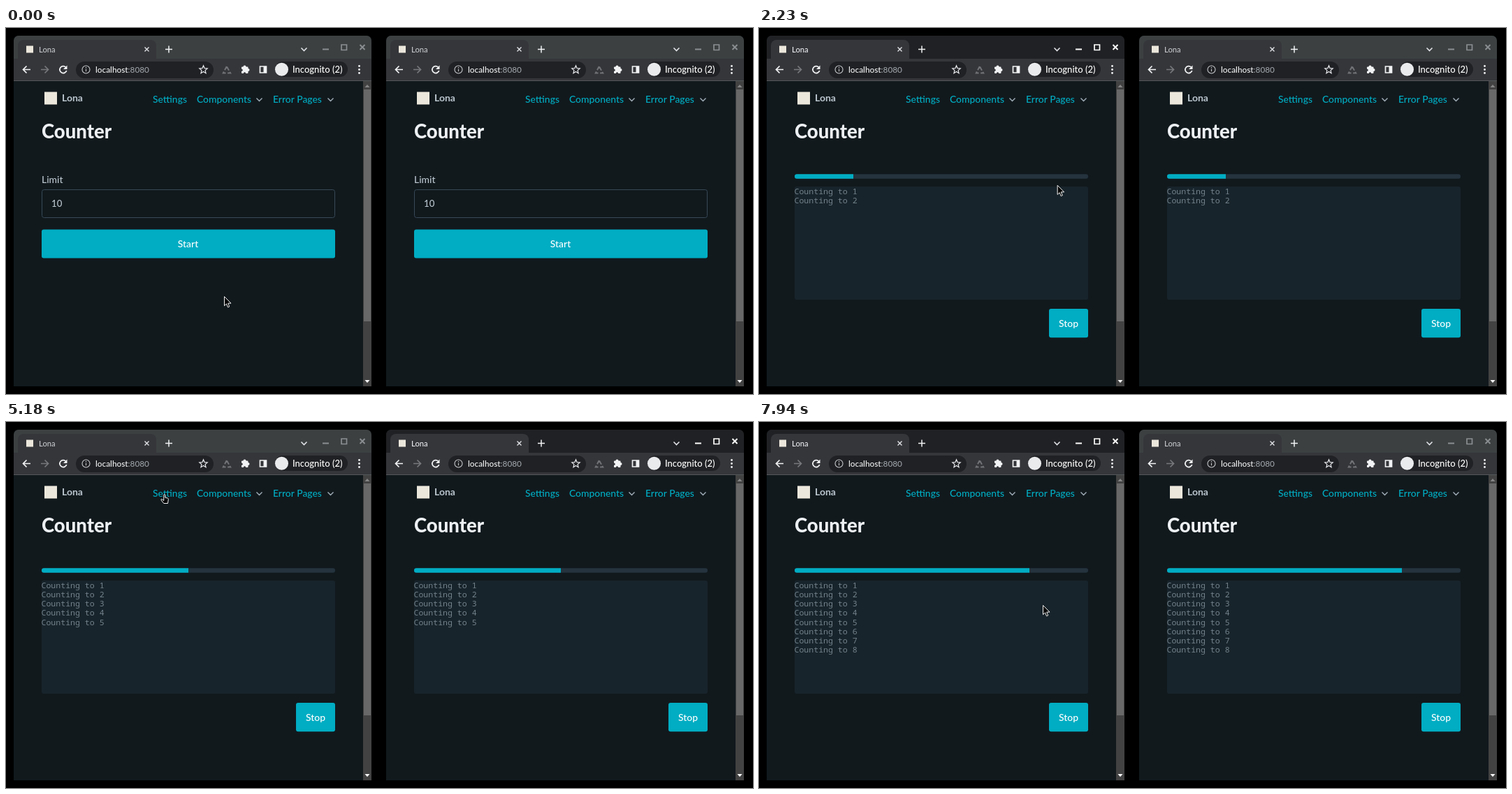
Write an HTML page with a canvas that moves like this. It is 1069 by 524 pixels and loops after 8 s.

```html
<!DOCTYPE html>
<html lang="en">
<head>
<meta charset="utf-8">
<title>Shared counter</title>
<style>
html, body { margin: 0; height: 100%; overflow: hidden; background: #000; }
canvas { display: block; }
</style>
</head>
<body>
<canvas id="stage" width="1069" height="524"></canvas>
<script>
const ctx = document.getElementById('stage').getContext('2d');
const LOOP = 8000;
const SANS = 'Lato, "Noto Sans", sans-serif';
const MONO = '"Noto Sans Mono", monospace';
const PAGE = '#11191d', BAR = '#35363a', DARK = '#202124', CYAN = '#00adc3';
const LIGHT = '#f1f3f4', LOGO = '#ece7dc';

// Pointer moves: start, end, visible steps, target x, target y
const moves = [
  [100, 410, 5, 306, 307],
  [1210, 1450, 4, 310, 308],
  [1510, 1970, 7, 385, 262],
  [2040, 2840, 11, 613, 58],
  [4520, 5180, 9, 225, 104],
  [5250, 5870, 9, 80, 57],
  [7640, 7940, 5, 406, 262]
];

const within = (t, from, to) => t >= from && t < to;
const smooth = p => p * p * (3 - 2 * p);

function pointerAt(t) {
  let x = 312, y = 384;
  for (const [start, end, steps, toX, toY] of moves) {
    if (t < start) break;
    const step = Math.floor((t - start) / (end - start) * (steps - 1) + 1e-6) + 1;
    const p = smooth(Math.min(1, step / steps));
    x += (toX - x) * p;
    y += (toY - y) * p;
  }
  return { x, y };
}

function box(x, y, w, h, color, radius = 0) {
  ctx.fillStyle = color;
  ctx.beginPath();
  ctx.roundRect(x, y, w, h, radius);
  ctx.fill();
}

function disc(x, y, r, color) {
  ctx.fillStyle = color;
  ctx.beginPath();
  ctx.arc(x, y, r, 0, 2 * Math.PI);
  ctx.fill();
}

function line(d, color, width = 1.5) {
  ctx.strokeStyle = color;
  ctx.lineWidth = width;
  ctx.stroke(new Path2D(d));
}

function shape(d, color) {
  ctx.fillStyle = color;
  ctx.fill(new Path2D(d));
}

function text(str, x, y, size, color, weight = 500, family = SANS, align = 'left') {
  ctx.font = `${weight} ${size}px ${family}`;
  ctx.textAlign = align;
  ctx.fillStyle = color;
  ctx.fillText(str, x, y);
}

function address(x, y, size) {
  text('localhost', x, y, size, LIGHT);
  text(':8080', x + ctx.measureText('localhost').width, y, size, '#9aa0a6');
}

function star(cx, cy, r) {
  let d = '';
  for (let i = 0; i < 10; i++) {
    const a = i * Math.PI / 5 - Math.PI / 2, k = i % 2 ? r * 0.45 : r;
    d += `${i ? 'L' : 'M'}${cx + k * Math.cos(a)} ${cy + k * Math.sin(a)}`;
  }
  line(d + 'Z', '#e8eaed', 1.2);
}

function titleBar(win) {
  const control = win.active ? '#fff' : '#8b8e91';
  box(0, 0, 512, 34, win.active ? DARK : '#3c4041');
  box(6, 6, 198, 34, BAR, [8, 8, 0, 0]);
  const s = 10 * win.icon;
  box(23 - s / 2, 19.5 - s / 2, s, s, LOGO);
  text(win.title, 36, 23.5, 11.2, win.active ? '#e8eaed' : '#c3c6c9');
  line('M187.5 16.5l6 6m0-6l-6 6', '#dfe1e5', 1.4);
  line('M217 19.5h10m-5-5v10', LIGHT, 1.5);
  line('M411.5 17.5l4 4 4-4', '#dfe1e5', 1.6);
  line('M442 19.5h9', control, 2);
  line('M469 13h7.5v7.5H469z', control, 1.7);
  line('M495.5 13l7 7m0-7l-7 7', control, 1.9);
}

function toolbar(win) {
  box(0, 33, 512, 31, BAR);
  box(0, 64, 512, 1, '#54575a');
  line('M24 48.5H13.5m5-5l-5 5 5 5', LIGHT, 1.7);
  line('M39 48.5h10.5m-5-5l5 5-5 5', '#76787b', 1.7);
  if (win.reloadHover) disc(71, 48.5, 12, '#505154');
  line('M74.4 45A5 5 0 1 0 75.7 50', LIGHT, 1.7);
  shape('M76.5 42.5v5.5H71z', LIGHT);

  box(89, 37, 197, 24, DARK, 12);
  line('M109 48.5a5.5 5.5 0 1 0-11 0 5.5 5.5 0 1 0 11 0M103.5 47.7v3.6', '#c6c9cc', 1.1);
  disc(103.5, 45.8, 0.8, '#c6c9cc');
  address(117, 52.5, 11.8);
  star(271.5, 48.8, 6);

  ctx.setLineDash([6, 2.5]);
  line('M304.8 44l-5 9.5h10.4z', '#707276', 2);
  ctx.setLineDash([]);

  box(326, 44.5, 9.5, 9.5, LIGHT, 1);
  disc(330.5, 44.5, 2, LIGHT);
  disc(335.5, 49, 2, LIGHT);
  disc(326, 49.3, 1.7, BAR);
  disc(330.5, 54, 1.7, BAR);

  line('M352.5 44h9v9h-9z', LIGHT, 1.7);
  box(357.5, 44, 4, 9, LIGHT);

  box(374, 37, 104, 22, DARK, 11);
  disc(383.5, 48.2, 9.5, '#e9ebed');
  text('Incognito (2)', 399, 52.5, 13, '#fff');
  for (const y of [43.5, 48.5, 53.5]) disc(494.5, y, 1.4, LIGHT);
}

function scrollBar() {
  box(500, 65, 12, 437, '#424242');
  box(501, 77, 10, 332, '#686868');
  shape('M502.5 74l3.5-4 3.5 4z', '#858585');
  shape('M502.5 493l3.5 4 3.5-4z', '#fff');
}

function navigation() {
  box(44, 80.5, 18, 18, LOGO);
  text('Lona', 69, 94, 14, '#bbc6ce', 700);
  text('Settings', 199, 96, 13.9, CYAN);
  text('Components', 262, 96, 13.9, CYAN);
  text('Error Pages', 371, 96, 13.9, CYAN);
  for (const x of [347.5, 449.5]) line(`M${x} 89.5l4 4 4-4`, '#a2afb9', 1.4);
}

function form(hover) {
  text('Limit', 40, 211, 13.9, '#bbc6ce');
  ctx.strokeStyle = '#374956';
  ctx.lineWidth = 1;
  ctx.beginPath();
  ctx.roundRect(40.5, 220.5, 419, 40, 3);
  ctx.stroke();
  text('10', 54, 245, 13.2, '#bbc6ce');
  box(40, 277.5, 420, 41, hover ? '#00bbd3' : CYAN, 3);
  text('Start', 249.5, 303, 13.9, '#fff', 500, SANS, 'center');
}

function counter(count) {
  box(40, 198.2, 420, 6.6, '#24333e', 3.3);
  box(40, 198.2, 42 * count, 6.6, CYAN, [3.3, 0, 0, 3.3]);
  box(40, 216, 420, 162, '#18242b', 3);
  for (let i = 1; i <= count; i++) {
    text(`Counting to ${i}`, 39.5, 213.9 + 13.14 * i, 11.55, '#73828c', 400, MONO);
  }
  box(404, 391, 56, 41.3, CYAN, 3);
  text('Stop', 432, 417, 13.9, '#fff', 500, SANS, 'center');
}

function drawWindow(x, win) {
  ctx.save();
  ctx.translate(x, 11);
  ctx.beginPath();
  ctx.roundRect(0, 0, 512, 502, [7, 7, 0, 0]);
  ctx.clip();
  box(0, 0, 512, 502, PAGE);
  titleBar(win);
  toolbar(win);
  scrollBar();
  navigation();
  if (!win.blank) {
    text('Counter', 40, 147, 27.5, '#edf0f3', 800);
    if (win.count) counter(win.count);
    else form(win.buttonHover);
  }
  if (win.status) {
    ctx.globalAlpha = win.status;
    box(0, 484, 91, 18, BAR, [0, 4, 0, 0]);
    text('localhost:8080', 6, 497, 11.6, '#bdc1c6');
  }
  ctx.restore();
}

function tooltip() {
  box(622, 71, 94, 19, '#fff');
  text('Reload this page', 628.5, 84.3, 11.4, '#3c4043');
}

function drawPointer({ x, y }, hand) {
  const d = hand
    ? 'M.8.7c0-1.5 2-1.5 2 0v3.5l3.5.8c1 .3 1 1 1 2l-.8 5.5H.8L-2.8 8c-1-1.5.5-2 1.5-1L.8 8.5z'
    : 'M.5.5v13.2l3-2.8 2 4.9 2.2-.9-2-4.8H10z';
  ctx.save();
  ctx.translate(x, y);
  ctx.lineJoin = 'round';
  shape(d, '#000');
  line(d, '#f4f4f4', 1);
  ctx.restore();
}

function statusAlpha(t) {
  if (within(t, 640, 730)) return 0.5;
  if (within(t, 730, 1210)) return 1;
  return within(t, 1210, 1290) ? 0.5 : 0;
}

function draw(t) {
  const pointer = pointerAt(t);
  const count = t < 870 ? 0 : Math.floor((t - 850) / 980) + 1;
  const overReload = x => Math.hypot(pointer.x - x, pointer.y - 59.5) < 13;
  const overStart = !count && pointer.y > 288 && pointer.y < 330;
  const overLink = pointer.y > 93 && pointer.y < 112 && pointer.x > 209 && pointer.x < 260;
  const rightLoading = within(t, 4190, 4380);
  const leftLoading = within(t, 6190, 6950);
  const growing = within(t, 6950, 7040);

  box(0, 0, 1069, 524, '#000');
  drawWindow(11, {
    active: within(t, 870, 3160) || t >= 6030,
    title: 'Lona',
    icon: leftLoading ? 0.6 : growing ? 0.8 : 1,
    reloadHover: overReload(82),
    blank: within(t, 6190, 6250),
    buttonHover: overStart,
    status: statusAlpha(t),
    count
  });
  drawWindow(544, {
    active: within(t, 3160, 6030),
    title: rightLoading ? 'localhost:8080' : 'Lona',
    icon: rightLoading ? 0.6 : 1,
    reloadHover: overReload(615),
    blank: rightLoading,
    count
  });
  if (within(t, 2980, 3160)) tooltip();
  drawPointer(pointer, overStart || within(t, 870, 1210) || overLink);
}

const began = performance.now();
function tick() {
  draw((performance.now() - began) % LOOP);
  requestAnimationFrame(tick);
}
tick();
</script>
</body>
</html>
```
